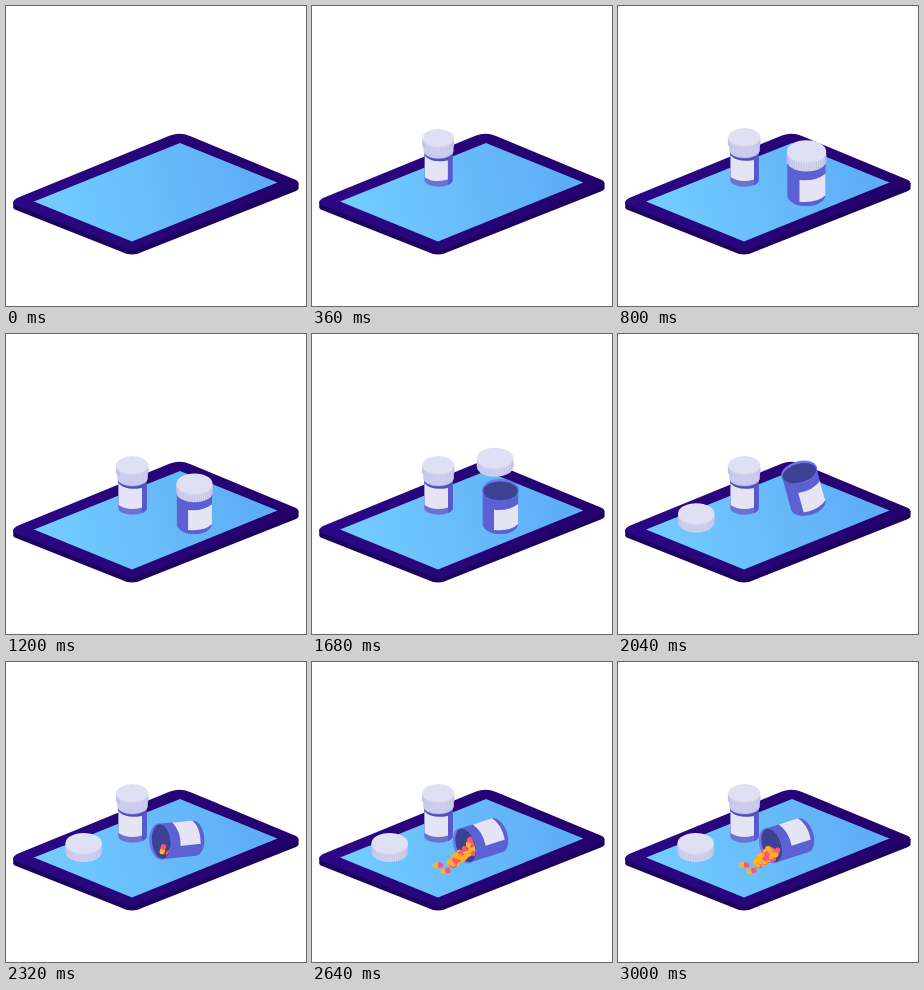
These frames come from a looping animation (300x300 px, 4400 ms). An HTML page:

```html
<!DOCTYPE html>
<html lang="en">
<head>
<meta charset="utf-8">
<title>Pills on a tablet</title>
<style>
html, body { margin: 0; width: 100%; height: 100%; overflow: hidden; background: #fff; }
svg { display: block; width: 100%; height: 100%; }
</style>
</head>
<body>
<svg viewBox="0 0 300 300">
  <defs>
    <linearGradient id="glass" gradientUnits="userSpaceOnUse" x1="50" y1="215" x2="245" y2="165">
      <stop offset="0" stop-color="#72caff"/><stop offset="1" stop-color="#5eaef5"/>
    </linearGradient>
    <linearGradient id="frame" x1="0" x2="1">
      <stop offset="0" stop-color="#2b0884"/><stop offset="1" stop-color="#24006c"/>
    </linearGradient>
    <clipPath id="spill">
      <g></g>
      <ellipse class="pose" cy="-16.5" rx="16.8" ry="9.6"/>
      <rect class="pose" x="-70" y="-96.5" width="140" height="80"/>
    </clipPath>
  </defs>

  <path fill="#1d0360" d="M7.2 195.5v5Q7 203 10 204L116 246Q126 251 136 246L290 185Q293 183.5 292.6 182V177Z"/>
  <path fill="url(#frame)" d="M11 192L164 129.5Q174 126 184 130L290 174Q295 177 290 180L136 241Q126 246 116 241L10 199Q4 196 11 192Z"/>
  <path fill="url(#glass)" d="M28 195.5L174 137L271.5 176.5L126 235.5Z"/>

  <g id="small">
    <path fill="#6d70d2" d="M112.2 144V174A14.3 6.8 0 0 0 140.8 174V144Z"/>
    <path fill="#5559cb" d="M136 146V179.200Q140.800 177 140.800 174V146Z"/>
    <path fill="#4e50b8" d="M112.200 145A14.300 7.800 0 0 0 140.800 145V147.500A14.300 7.800 0 0 1 112.200 147.500Z"/>
    <path fill="#e4e4f5" d="M112.600 149.500Q120 157 136 154V173.500Q122 177.500 112.600 171Z"/>
    <path fill="#c9caee" d="M111.200 138V144A15.200 8 0 0 0 141.800 144V138Z"/>
  </g>
  <g id="big">
    <g class="pose">
      <path fill="#5b60d3" d="M-17.800 -16V17.500A17.500 10 0 0 0 17.500 17.500L17.800 -16Z"/>
      <path fill="#e4e4f5" d="M-6.500 3.300Q8 5 17.600 -2.500V17.500Q10 25 -6.500 23.500Z"/>
      <ellipse cy="-16.500" rx="18.400" ry="11" fill="#6c77ec"/>
      <ellipse cy="-15.500" rx="17.300" ry="9.400" fill="#3d4193"/>
    </g>
    <g id="lid"></g>
  </g>
  <g id="pills" clip-path="url(#spill)"></g>
</svg>
<script>
const LOOP = 4400, NS = 'http://www.w3.org/2000/svg';
const $ = id => document.getElementById(id);
const clamp = x => Math.min(1, Math.max(0, x));
const span = (t, a, b) => clamp((t - a) / (b - a));
const mix = (a, b, k) => a + (b - a) * k;
const smooth = k => k * k * (3 - 2 * k);
const cubic = k => k < .5 ? 4 * k ** 3 : 1 - 4 * (1 - k) ** 3;
const bezier = (a, b, c, d, u) => {
  const v = 1 - u;
  return a * v ** 3 + 3 * b * v * v * u + 3 * c * v * u * u + d * u ** 3;
};

function add(parent, tag, attrs) {
  const el = document.createElementNS(NS, tag);
  for (const k in attrs) el.setAttribute(k, attrs[k]);
  return parent.appendChild(el);
}

// Ridged cap centred on its own origin.
function drawCap(parent, rx, ry, h) {
  const y = h / 2;
  add(parent, 'path', { fill: '#d5d5ef', d: `M${-rx} ${-y}V${y}A${rx} ${ry} 0 0 0 ${rx} ${y}V${-y}Z` });
  let d = '';
  for (let i = 1; i < 24; i++) {
    const a = Math.PI * i / 24;
    d += `M${rx * Math.cos(a)} ${y + ry * Math.sin(a) - .6}v${1.8 - h}`;
  }
  add(parent, 'path', { d, stroke: '#bdbde4', 'stroke-width': .7, fill: 'none' });
  add(parent, 'ellipse', { cy: -y, rx, ry, fill: '#dfe0f3' });
}
drawCap(add($('small'), 'g', { transform: 'translate(126.2 134.5)' }), 16, 9, 7);
drawCap($('lid'), 18.2, 10.3, 8.5);

let seed = 11;
const rand = () => (seed = seed * 16807 % 2147483647) / 2147483647;
rand();

const pills = [{ x: 126, y: 203, a: 0 }, { x: 133.5, y: 209, a: -12 }];
for (let i = 0; i < 26; i++) {
  const f = 1 - i / 25;
  pills.push({
    x: 153 - 13 * f + (rand() * 2 - 1) * (8 - 6 * f),
    y: 190 + 12 * f + (rand() * 2 - 1) * (7 - 5 * f),
    a: rand() * 360
  });
}
pills.forEach((p, i) => {
  p.side = (rand() * 2 - 1) * 12;
  p.start = 2245 + i * 14;
  p.el = add($('pills'), 'g', {});
  add(p.el, 'path', { fill: '#ffb224', d: 'M0 -2.600H-2.600A2.600 2.600 0 0 0 -2.600 2.600H0Z' });
  add(p.el, 'path', { fill: '#ff5570', d: 'M0 -2.600H2.600A2.600 2.600 0 0 1 2.600 2.600H0Z' });
});
document.querySelector('#spill g').remove();
const posed = document.querySelectorAll('.pose');

// Grow, overshoot, dip, settle.
function pop(t) {
  if (t < 170) return 1.1 * Math.sin(clamp(t / 170) * Math.PI / 2);
  if (t < 300) return mix(1.1, .95, smooth((t - 170) / 130));
  return mix(.95, 1, smooth(span(t, 300, 720)));
}

function grow(el, s, x, y) {
  el.setAttribute('visibility', s > 0 ? 'visible' : 'hidden');
  el.setAttribute('transform', `translate(${x} ${y}) scale(${s}) translate(${-x} ${-y})`);
}

function render(t) {
  grow($('small'), pop(t - 100), 126.5, 180.5);
  grow($('big'), pop(t - 600), 188.5, 200);

  const u = cubic(span(t, 1490, 2110));
  $('lid').setAttribute('transform',
    `translate(${bezier(188.5, 180, 110, 77.7, u)} ${bezier(153.5, 70, 85, 185.5, u)})`);

  const k = smooth(span(t, 1920, 2426));
  const hop = 20 * Math.sin(Math.PI * span(t, 1860, 2300));
  const bx = mix(188.5, 168.5, k), by = mix(172.5, 178.5, k) - hop, turn = -108 * k;
  posed.forEach(el => el.setAttribute('transform', `translate(${bx} ${by}) rotate(${turn})`));

  const r = turn * Math.PI / 180, c = Math.cos(r), s = Math.sin(r);
  $('pills').setAttribute('visibility', t > 2200 ? 'visible' : 'hidden');
  for (const p of pills) {
    const q = span(t, p.start, p.start + 370), e = 1 - (1 - q) ** 2;
    const x = mix(bx + p.side * c - 4 * s, p.x, e);
    const y = mix(by + p.side * s + 4 * c, p.y, e);
    p.el.setAttribute('transform', `translate(${x} ${y}) rotate(${p.a - 120 * (1 - e)})`);
  }
}

const t0 = performance.now();
function tick() {
  render((performance.now() - t0) % LOOP);
  requestAnimationFrame(tick);
}
tick();
</script>
</body>
</html>
```
